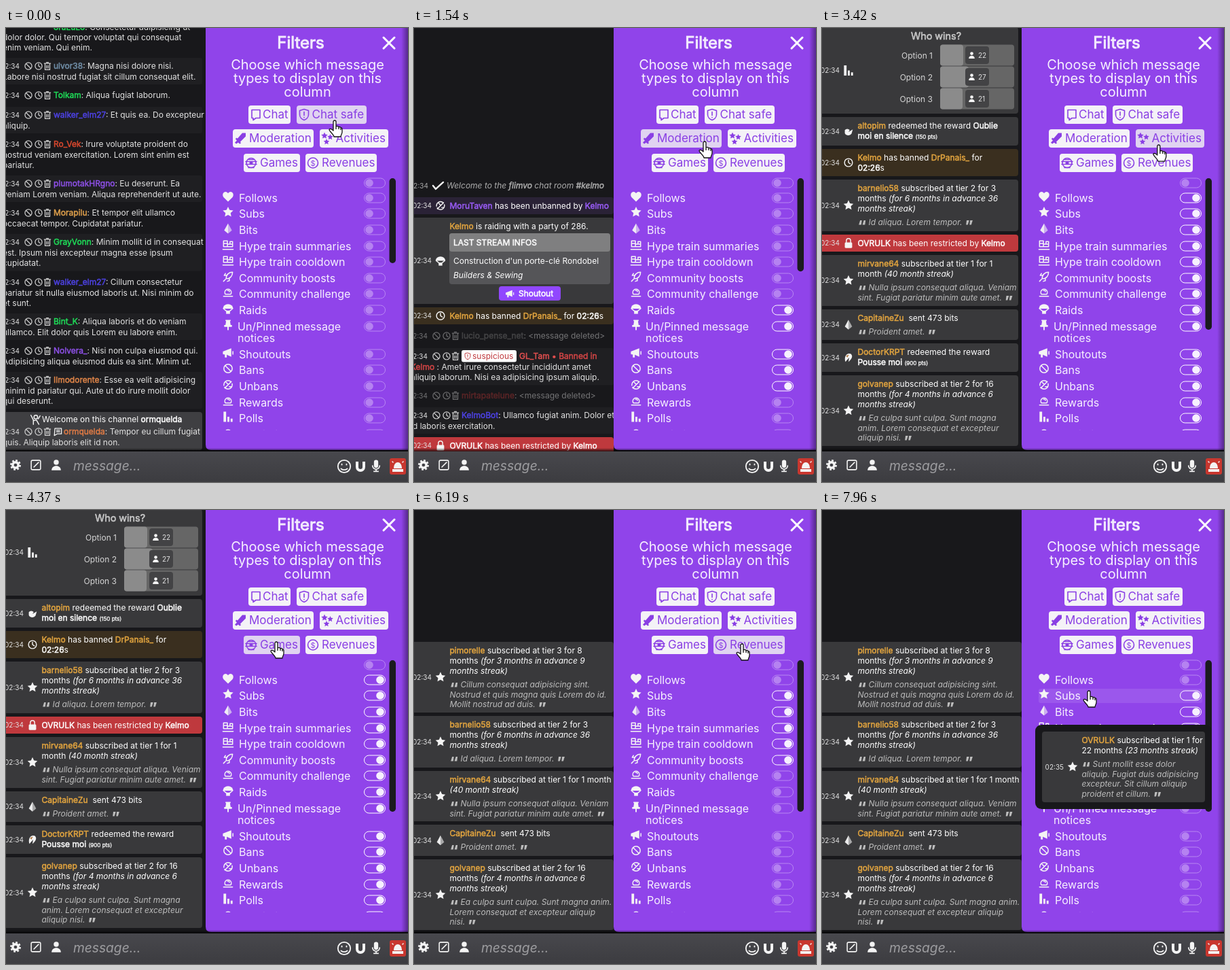
These frames come from a looping animation (592x668 px, 8 s). An HTML page:

```html
<!DOCTYPE html>
<html lang="en">
<head>
<meta charset="utf-8">
<title>Chat filters</title>
<style>
html,body{margin:0;width:592px;height:668px;overflow:hidden;background:#18181b}
svg{display:block;font:12px Inter,"Liberation Sans",sans-serif;font-optical-sizing:none}
text{white-space:pre;color:#e2e2e2}
text,tspan{fill:currentColor}
.b,.y,.p,.r,.s{stroke:currentColor;stroke-width:.04em}
.y{color:#e3a53f}.p{color:#9a5cf8}.r{color:#d34545}.s{font-size:8px}
.i{font-style:italic}
.q{font-size:20px;font-weight:900;font-style:normal}
.w{color:#fff}
.end{text-anchor:end}.mid{text-anchor:middle}
.time{font-size:10px;text-anchor:end}
.quote{color:#bdbdbd;font-style:italic}
.l{fill:none;stroke:currentColor;stroke-width:1.6;stroke-linejoin:round;stroke-linecap:round}
</style>
</head>
<body>
<svg id="stage" width="592" height="668" viewBox="0 0 592 668"></svg>
<script>
const LOOP = 8000, PURPLE = '#9044ea', CARD = '#39393b';

// ---- drawing helpers ----
const rich = s => s.replace(/\[([^\]:]+):([^\]]*)\]/g, (_, k, v) => k[0] === '#'
  ? `<tspan class="b" style="color:${k}">${v}</tspan>` : `<tspan class="${k}">${v}</tspan>`);
const txt = (x, mid, s, cls = '', size = 12, color = '') =>
  `<text x="${x}" y="${mid + size * .364}" class="${cls}" style="${size !== 12 ? `font-size:${size}px;` : ''}${color && 'color:' + color}">${rich(s)}</text>`;
const rect = (x, y, w, h, fill, r = 0, more = '') =>
  `<rect x="${x}" y="${y}" width="${w}" height="${h}" rx="${r}" fill="${fill}" ${more}/>`;
const line = d => `<path class="l" d="${d}"/>`;
const solid = (d, more = '') => `<path d="${d}" ${more}/>`;
const ring = (r, more = '') => `<circle class="l" r="${r}" ${more}/>`;
const starPath = (x, y, r) => 'M' + Array.from({length: 10}, (_, i) => {
  const a = i * Math.PI / 5, d = i % 2 ? r * .48 : r;
  return (x + d * Math.sin(a)).toFixed(2) + ' ' + (y - d * Math.cos(a)).toFixed(2);
}).join('L') + 'Z';

const icons = {
  ban: ring(6.5) + line('M-4.5-4.5L4.5 4.5'),
  unban: ring(6.5, 'stroke-dasharray="16 3"') + line('M-5 5L5-5M-3-4L0-1M2 3H5'),
  clock: ring(6.5) + line('M0-4V0L3 2'),
  trash: line('M-6-5H6M-2-7H2M-4.5-4V7H4.5V-4M-1.5-1V4M1.5-1V4'),
  star: solid(starPath(0, 0, 8.5)),
  stars: solid(starPath(-4, -4, 5) + starPath(4.5, -2, 4.5) + starPath(-1, 5, 4.5)),
  heart: solid('M0 8L-7 1C-11-5-4-11 0-5C4-11 11-5 7 1Z'),
  gem: solid('M0-8L-6 3L0 8Z', 'opacity=".95"') + solid('M0-8L6 3L0 8Z', 'opacity=".6"'),
  train: line('M-8 7H8M-7 3V-6H-1V3M-7-2H-1M-7 3H7V-5H3V-1H-1M3-1H7'),
  rocket: line('M-3 3C-3-4 2-7 7-7C7-2 4 3-3 3ZM-2-2H-6L-4-5M2 2V6L-1 7M-7 7L-4 4'),
  coin: line('M-7 6H7M-4 3A5 5 0 1 1 4 3ZM-1-3A2 2 0 0 1 2-1'),
  chute: solid('M-8 0A8 7 0 0 1 8 0Z') + line('M-7 0L-2 4M7 0L2 4') + solid('M-3 3H3V8H-3Z'),
  pin: solid('M-4-8H4V-6H3L4 0H6V3H1V8H-1V3H-6V0H-4L-3-6H-4Z'),
  horn: solid('M-8-2L5-7V6L-2 3V7H-5V2.5L-8 2Z') + line('M7.5-2V2'),
  bars: solid('M-7-8H-3V8H-7ZM-1 0H2V8H-1ZM4 3H7V8H4Z'),
  shield: line('M0-8L6.5-6V0C6.5 4 3 7 0 8C-3 7-6.5 4-6.5 0V-6ZM0-4V1M0 4V4.2'),
  bubble: line('M-6-7H6V5H0L-4 8V5H-6Z'),
  sword: solid('M8-8V-3L0 5L1 7L-1 8L-3 6L-6 8L-8 6L-5 3L-7 1L-6-1L-4 0L3-8Z'),
  ball: ring(7) + line('M-8-2H8M-8 2H8M-4-5H4M-4 7H4') + `<circle r="2.5"/>`,
  cash: ring(7.5) + txt(0, 0, '$', 'mid', 11, 'inherit'),
  person: `<circle cy="-4" r="3.8"/>` + solid('M-7 8C-7-1 7-1 7 8Z'),
  gear: ring(4.2, 'style="stroke-width:3.6"') + ring(6.8, 'style="stroke-width:2.6;stroke-linecap:butt" stroke-dasharray="2.8 2.54"'),
  slate: line('M-5-7H5Q7-7 7-5V5Q7 7 5 7H-5Q-7 7-7 5V-5Q-7-7-5-7ZM-3 3L4-4'),
  smile: ring(8) + line('M-3-3V-2M3-3V-2M-4 3Q0 6 4 3'),
  magnet: `<path class="l" style="stroke-width:4;stroke-linecap:butt" d="M-5-7V1A5 5 0 0 0 5 1V-7"/>`,
  mic: rect(-3, -8, 6, 11, 'currentColor', 3) + line('M-5 0A5 5 0 0 0 5 0M0 5V8M-3 8H3'),
  siren: solid('M-6 3C-6-9 6-9 6 3ZM-8 4H8V8H-8Z') + line('M-7-6L-8-7M7-6L8-7'),
  lock: rect(-6, -1, 12, 9, 'currentColor', 1.5) + line('M-3.5-1V-4A3.5 3.5 0 0 1 3.5-4V-1'),
  check: `<path class="l" style="stroke-width:2.4" d="M-7 0L-3 5L8-5"/>`,
  wave: `<circle class="l" cx="1" cy="-4" r="3"/>` + line('M-7-7L-3 1V8M-3 2L2 1L6 8M5-1L8-6'),
  note: line('M-5-6H7V4H-1L-6 7ZM-2-3H4M-2 0H4'),
  ghost: solid('M-6 7V-1A6 6 0 0 1 6-1V7Z') + `<g fill="#333"><circle cx="-2" cy="-1" r="1.4"/><circle cx="3" cy="-1" r="1.4"/></g>`,
  bird: solid('M-6-2A5 5 0 0 1 2-2L0 1L7-3L5 4A6 5 0 0 1-6 3Z'),
  loop: ring(6.5, 'stroke-dasharray="13 4"') + solid('M-2-3H2V4H-2Z'),
  wing: solid('M-5 7C-8-2-2-9 4-6C8-2 5 3 0 7L1 0Z') + solid('M-4-3L1-5L-2 0Z', 'fill="#b0763f"'),
};
const ic = (name, x, y, k = 1, color = '#f4f4f4') =>
  `<g transform="translate(${x} ${y}) scale(${k})" fill="currentColor" style="color:${color}">${icons[name]}</g>`;

// ---- chat rows ----
function msg(y, lines, {x = 70, dim = 1, bg, w = 289} = {}) {
  const n = lines.length, step = 15.5;
  return (bg ? rect(-6, y - 12, w + 6, n * step + 8, '#1f1f22', 3) : '') +
    `<g opacity="${dim}">` + txt(20, y, '02:34', 'time', 10) +
    ['ban', 'clock', 'trash'].map((k, i) => ic(k, [33, 48, 61][i], y, .78, '#d0d0d0')).join('') +
    lines.map((s, i) => txt(i ? -5 : x, y + i * step, s)).join('') + '</g>';
}
function event(top, bottom, icon, lines, quote = [], {w = 294, bg = CARD, time = '02:34'} = {}) {
  const mid = (top + bottom) / 2, first = top + 12.7, qy = first + (lines.length - 1) * 15 + 20;
  return rect(-6, top, w + 6, bottom - top, bg, 4) + txt(26, mid, time, 'time', 10) + ic(icon, 39, mid, .9) +
    lines.map((s, i) => txt(52.5, first + i * 15, s, 'w')).join('') +
    (quote.length ? txt(52.5, qy + 5.5, '“', 'q', 20, '#bdbdbd') : '') +
    quote.map((s, i) => txt(i ? 52.5 : 68.5, qy + i * 14.6,
      s + (i === quote.length - 1 ? '<tspan class="q" dx="4" dy="8">”</tspan>' : ''), 'quote')).join('');
}
function poll(top, bottom, fills, counts, w) {
  const barW = w === 294 ? 114 : 109, y0 = top + 41;
  return rect(-6, top, w + 6, bottom - top, CARD, 4) + txt(26, (top + bottom) / 2, '02:34', 'time', 10) +
    ic('bars', 39, (top + bottom) / 2, .95) + txt(w === 294 ? 171 : 168, top + 13, 'Who wins?', 'b mid', 14.4, '#c9c9c9') +
    fills.map((f, i) => {
      const y = y0 + i * 32, c = 174 + barW / 2;
      return txt(163, y + .5, 'Option ' + (i + 1), 'end', 12, '#d6d6d6') + rect(174, y - 15.5, barW, 31, '#666', 4) +
        rect(174, y - 15.5, f, 31, '#8b8b8b', Math.min(4, f / 2)) + rect(c - 17.5, y - 13, 35, 26, '#434345', 4) +
        ic('person', c - 8, y, .62) + txt(c + 1.5, y, '' + counts[i], '', 10);
    }).join('');
}
const banText = '[y:Kelmo] has banned [y:DrPanais_] for', RED = '#bf393d', BROWN = '#3a2f1f';
const restricted = '[b:OVRULK] has been restricted by [b:Kelmo]';
const deleted = '&lt;message deleted>';
const blue = '#4d42e4', green = '#1fdc58', violet = '#8d50e6';

const chatScene = () =>
  txt(70, -1, `[${green}:oraLuLo]: Consectetur adipisicing ut`) +
  txt(-5, 14, 'dolor dolor. Qui tempor voluptat qui consequat') + txt(-5, 29, 'enim veniam. Qui enim.') +
  [[56, '#718fa8', 'ulvor38', 'Magna nisi dolore nisi.', 'Labore nisi nostrud fugiat sit cillum consequat elit.'],
   [99, green, 'Tolkam', 'Aliqua fugiat laborum.'],
   [128, blue, 'walker_elm27', 'Et quis ea. Do excepteur', 'aliquip.'],
   [171, '#d9482e', 'Ro_Vek', 'Irure voluptate proident do', 'nostrud veniam exercitation. Lorem sint enim est', 'pariatur.'],
   [229, violet, 'plumotakHRgno', 'Eu deserunt. Ea', 'veniam Lorem veniam. Aliqua reprehenderit ut aute.'],
   [272, '#dfa04c', 'Morapilu', 'Et tempor elit ullamco', 'occaecat tempor. Cupidatat pariatur.'],
   [315, green, 'GrayVonn', 'Minim mollit id in consequat', 'est. Ipsum nisi excepteur magna esse ipsum', 'cupidatat.'],
   [374, blue, 'walker_elm27', 'Cillum consectetur', 'pariatur sit nulla eiusmod laboris ut. Nisi minim do', 'et sunt.'],
   [432, green, 'Bint_K', 'Aliqua laboris et do veniam', 'ullamco. Elit dolor quis Lorem eu labore enim.'],
   [475, violet, 'Nolvera_', 'Nisi non culpa eiusmod qui.', 'Adipisicing aliqua eiusmod duis ea sint. Minim ut.'],
   [518, '#de8448', 'Ilmodorente', 'Esse ea velit adipisicing', 'minim id pariatur qui. Aute ut do irure mollit dolor', 'qui deserunt.'],
  ].map(([y, c, who, first, ...rest], i) => msg(y, [`[${c}:${who}]: ${first}`, ...rest], {bg: i % 2 === 0})).join('') +
  rect(-6, 565, 295, 56, '#3f3f42', 4) + ic('wave', 43, 576, .9) +
  txt(53, 576, 'Welcome on this channel [b:ormquelda]', 'w') + ic('note', 76, 594, .8) +
  msg(594, ['[#de7a45:ormquelda]: Tempor eu cillum fugiat', 'quis. Aliquip laboris elit id non.'], {x: 85});

const modScene = () =>
  txt(21, 223, '02:34', 'time', 10, '#aaa') + ic('check', 35, 223) +
  txt(48, 223, 'Welcome to the [b:flimvo] chat room [b:#kelmo]', 'i', 12, '#adadad') +
  event(240, 265, 'unban', ['[p:MoruTaven] has been unbanned by [p:Kelmo]'], [], {bg: '#2a2236'}) +
  event(270, 397, 'chute', ['[y:Kelmo] is raiding with a party of 286.']) +
  rect(52, 293, 237, 75, '#555558', 4) + rect(52, 293, 237, 27, '#7f7f80', 4) +
  txt(58, 307, 'LAST STREAM INFOS', 'b w') + txt(58, 334, "Construction d'un porte-clé Rondobel", 'w') +
  txt(58, 355, 'Builders &amp; Sewing', 'i w') +
  rect(125, 371, 91, 21, '#9147ff', 4) + ic('horn', 141, 382, .75) + txt(154, 382, 'Shoutout', 'b w') +
  event(402, 427, 'clock', [banText + ' [b:02:26]s'], [], {bg: BROWN}) +
  msg(444, ['[#777:lucio_pense_net]: ' + deleted], {dim: .45, w: 294}) +
  msg(474, ['', '[r:Kelmo] : Amet irure consectetur incididunt amet', 'aliquip laborum. Nisi ea adipisicing ipsum aliquip.'], {bg: 1, w: 294}) +
  rect(70, 465, 81, 17.5, '#fff', 3) + ic('shield', 79, 474, .6, '#bf393d') + txt(86, 474, 'suspicious', '', 12, '#bf393d') +
  txt(155, 474, '[#e04f4f:GL_Tam • ][r:Banned in]') +
  msg(532, ['[#a33:mirtapatelune]: ' + deleted], {dim: .45, w: 294}) +
  msg(561, [`[${blue}:KelmoBot]: Ullamco fugiat anim. Dolor et`, 'id laboris exercitation.'], {bg: 1, w: 294}) +
  event(593, 618, 'lock', [restricted], [], {bg: RED});

const narrow = {w: 289};
const subBarn = ['[y:barnelio58] subscribed at tier 2 for 3', 'months [i:(for 6 months in advance 36]', '[i:months streak)]'];
const subGol = ['[y:golvanep] subscribed at tier 2 for 16', 'months [i:(for 4 months in advance 6]', '[i:months streak)]'];
const nulla = ['Nulla ipsum consequat aliqua. Veniam', 'sint. Fugiat pariatur minim aute amet.'];
const bits = ['[y:CapitaineZu]  sent 473 bits'];
const silence = ['[y:altopim] redeemed the reward [b:Oublie]', '[b:moi en silence] [s:(150 pts)]'];

const activityScene = () =>
  poll(-1, 126, [34, 42, 33], [22, 27, 21], 289) +
  event(131, 173, 'bird', silence, [], narrow) +
  event(178, 218, 'clock', [banText, '[b:02:26]s'], [], {w: 289, bg: BROWN}) +
  event(223, 299, 'star', subBarn, ['Id aliqua. Lorem tempor.'], narrow) +
  event(304, 329, 'lock', [restricted], [], {w: 289, bg: RED}) +
  event(334, 409, 'star', ['[y:mirvane64] subscribed at tier 1 for 1', 'month [i:(40 month streak)]'], nulla, narrow) +
  event(414, 459, 'gem', bits, ['Proident amet.'], narrow) +
  event(464, 506, 'wing', ['[y:DoctorKRPT] redeemed the reward', '[b:Pousse moi] [s:(900 pts)]'], [], narrow) +
  event(511, 615, 'star', subGol, ['Ea culpa sunt culpa. Sunt magna', 'anim. Lorem consequat et excepteur', 'aliquip nisi.'], narrow);

const gameScene = () =>
  event(43, 85, 'ghost', ['[y:altopim] redeemed the reward [b:Beau flou]', '[s:(200 pts)]']) +
  event(90, 132, 'loop', ['[y:Fog_Teapot] redeemed the reward [b:Tourne]', '[b:moi] [s:(350 pts)]']) +
  poll(137, 392, [7, 27, 12, 13, 18, 14, 24], [12, 48, 19, 22, 31, 25, 42], 294) +
  poll(397, 524, [36, 44, 34], [22, 27, 21], 294) +
  event(529, 571, 'bird', silence) +
  event(576, 618, 'wing', ['[y:DoctorKRPT] redeemed the reward [b:Pousse]', '[b:moi] [s:(900 pts)]']);

const revenueScene = () =>
  event(194, 298, 'star', ['[y:pimorelle] subscribed at tier 3 for 8', 'months [i:(for 3 months in advance 9]', '[i:months streak)]'],
    ['Cillum consequat adipisicing sint.', 'Nostrud et quis magna quis Lorem do id.', 'Mollit nostrud ad duis.']) +
  event(303, 379, 'star', subBarn, ['Id aliqua. Lorem tempor.']) +
  event(384, 458, 'star', ['[y:mirvane64] subscribed at tier 1 for 1 month', '[i:(40 month streak)]'], nulla) +
  event(463, 509, 'gem', bits, ['Proident amet.']) +
  event(514, 618, 'star', subGol, ['Ea culpa sunt culpa. Sunt magna anim.', 'Lorem consequat et excepteur aliquip', 'nisi.']);

// ---- filter panel ----
const buttons = [
  ['Chat', 'bubble', 357, 114, 62, 21], ['Chat safe', 'shield', 428, 114, 103, 22.5],
  ['Moderation', 'sword', 334, 149, 119, 24], ['Activities', 'stars', 462, 149, 101, 23.5],
  ['Games', 'ball', 350, 185, 83, 24], ['Revenues', 'cash', 441, 185, 105, 24]];
const rows = [
  [228], [250, 'heart', 'Follows'], [273, 'star', 'Subs'], [297, 'gem', 'Bits'],
  [321, 'train', 'Hype train summaries'], [344, 'train', 'Hype train cooldown'], [368, 'rocket', 'Community boosts'],
  [391, 'coin', 'Community challenge'], [415, 'chute', 'Raids'], [439, 'pin', 'Un/Pinned message'],
  [480, 'horn', 'Shoutouts'], [503, 'ban', 'Bans'], [527, 'unban', 'Unbans'], [551, 'coin', 'Rewards'],
  [574, 'bars', 'Polls'], [598, 'coin', 'Predictions']];

const panel = () =>
  `<path d="M294 0H592V621H302Q294 621 294 613Z" fill="${PURPLE}"/>` + rect(582, 0, 10, 621, 'url(#edge)') +
  txt(434, 21, 'Filters', 'b mid', 24, '#f3ecfd') +
  `<path class="l" style="color:#fff;stroke-width:3" d="M556 14L572 30M572 14L556 30"/>` +
  ['Choose which message', 'types to display on this', 'column'].map((s, i) => txt(444, 54 + i * 20, s, 'mid', 20, '#f6f0fe')).join('') +
  buttons.map(([s, icon, x, y, w, dx]) => rect(x, y, w, 27, '#f4f2f7', 4, 'class="btn"') +
    ic(icon, x + 11, y + 13.5, 1, '#8a3fe4') + txt(x + dx, y + 13, s, '', 17, '#8a3fe4')).join('') +
  '<g clip-path="url(#list)">' + rect(319, 263, 241, 21, '#fff', 3, 'id="hover" opacity=".1"') +
  rows.map(([y, icon, s]) => (s ? ic(icon, 327, y - 2, .95) + txt(s[2] === '/' ? 341 : 343, y, s, '', 16, '#f6f0fe') : '') +
    `<g class="tog"><rect x="527.5" y="${y - 7}" width="31" height="14" rx="7" fill="none" stroke="#fff"/><circle cy="${y}" r="5.8" fill="#f6f0fe"/></g>`).join('') +
  txt(341, 456.5, 'notices', '', 16, '#f6f0fe') + '</g>' +
  rect(564.5, 221, 9.5, 125, '#1b1b1f', 4.7, 'id="thumb"');

const footer = () =>
  rect(0, 618, 592, 5, 'url(#drop)') + rect(0, 623, 592, 45, 'url(#bar)') +
  ['gear', 'slate', 'person'].map((k, i) => ic(k, 14 + 30 * i, 643, .98)).join('') +
  txt(99, 644, 'message...', 'i', 19.2, '#9d9da0') +
  ic('smile', 498, 645, 1.15) + ic('magnet', 522, 645) + ic('mic', 545, 644, 1.05) +
  rect(565, 633, 24, 24, '#c8372f', 3) + ic('siren', 577, 645);

const popup = () =>
  rect(314, 316, 260, 124, '#18181b', 9, 'id="popBox"') + '<g id="popMsg" transform="translate(330 0)">' +
  event(326, 430, 'star', ['[y:OVRULK] subscribed at tier 1 for', '22 months [i:(23 months streak)]'],
    ['Sunt mollit esse dolor', 'aliquip. Fugiat duis adipisicing', 'excepteur. Sit cillum aliquip', 'proident et cillum.'], {w: 234, time: '02:35'}) + '</g>';

const gradient = (id, dir, a, b) =>
  `<linearGradient id="${id}" x2="${dir}" y2="${1 - dir}"><stop stop-color="${a}"/><stop offset="1" stop-color="${b}"/></linearGradient>`;
const stage = document.getElementById('stage');
stage.innerHTML =
  `<defs>${gradient('edge', 1, 'rgba(0,0,0,0)', 'rgba(0,0,0,.4)')}${gradient('drop', 0, 'rgba(0,0,0,0)', 'rgba(0,0,0,.75)')}${gradient('bar', 0, '#48484d', '#3c3c40')}
  <clipPath id="list"><rect x="300" y="215" width="290" height="377"/></clipPath></defs>` +
  [chatScene, modScene, activityScene, gameScene, revenueScene].map(f => `<g class="scene">${f()}</g>`).join('') +
  panel() + footer() + `<g id="pop">${popup()}</g>` +
  `<g id="cursor" fill="#fff" stroke="#111" stroke-width="1.3" stroke-linejoin="round">
  <path id="hand" d="M-2 2C-2-.7 2-.7 2 2V9C4 8 5.5 8.5 6 9.8C8 9 9 10 9 11C10.5 10.5 11 11.5 11 13V17C11 20 9 21 9 24H-1C-1 21-8 16-8 13.5C-7 11.5-4 12.5-2 15ZM2 9V13M6 10V13M9 11V14"/>
  <path id="arrow" d="M0 0V16L3.7 12.5L6.5 19L9.5 17.8L6.7 11.5H11.5Z"/></g>`;

// ---- timeline ----
const $ = id => document.getElementById(id), all = c => [...stage.querySelectorAll(c)];
const scenes = all('.scene'), btns = all('.btn'), togs = all('.tog');
const swaps = [1280, 2830, 4500, 6180];
const flips = [940, 2790, 4430, 6060];
const active = [[99, 0], [8, 12], [1, 15], [13, 15], [2, 6]];
const path = [[0, 484, 136], [80, 484, 136], [390, 412, 164], [890, 412, 164], [1080, 428, 167], [1600, 428, 167],
  [2040, 496, 172], [3420, 496, 172], [3870, 398, 194], [5120, 398, 194], [5450, 483, 197], [6760, 483, 197],
  [6880, 424, 235], [7070, 424, 235], [7140, 418, 264], [7320, 412, 266], [7640, 412, 266], [7710, 393, 266], [LOOP, 393, 266]];
const ramp = (t, a, b) => Math.min(1, Math.max(0, (t - a) / (b - a)));
const passed = (list, t) => list.filter(v => t >= v).length;
const show = (el, on) => el.setAttribute('display', on ? 'inline' : 'none');
const isOn = (k, i) => +(i >= active[k][0] && i <= active[k][1]);

function cursorAt(t) {
  const n = path.findIndex(p => p[0] > t), a = path[n - 1], b = path[n], k = ramp(t, a[0], b[0]);
  return [a[1] + (b[1] - a[1]) * k, a[2] + (b[2] - a[2]) * k];
}

function render(t) {
  const current = passed(swaps, t), settle = ramp(t, 1470, 2040);
  scenes.forEach((g, i) => show(g, i === current));
  scenes[1].setAttribute('transform', `translate(0 ${10.2 * (1 - settle)})`);
  $('thumb').setAttribute('height', 125 + 98 * settle);

  const k = passed(flips, t), turn = k ? ramp(t, flips[k - 1], flips[k - 1] + 110) : 1;
  togs.forEach((g, i) => {
    const from = k ? isOn(k - 1, i) : 0, v = from + (isOn(k, i) - from) * turn;
    g.setAttribute('opacity', .36 + .64 * v);
    g.lastChild.setAttribute('cx', 535 + 16 * v);
  });

  const [x, y] = cursorAt(t);
  let over = false;
  buttons.forEach(([, , bx, by, w], i) => {
    const hit = x >= bx && x <= bx + w && y >= by && y <= by + 27;
    over = over || hit;
    btns[i].setAttribute('fill', hit ? '#e0d3f1' : '#f4f2f7');
  });
  const row = rows.find(([c]) => c > 240 && Math.abs(y - c) < 11);
  show($('hover'), row);
  if (row) $('hover').setAttribute('y', row[0] - 10);
  show($('hand'), over || row);
  show($('arrow'), !over && !row);
  $('cursor').setAttribute('transform', `translate(${x} ${y})`);

  const loaded = t >= 7890;
  show($('pop'), t >= 7080);
  show($('popMsg'), loaded);
  $('popBox').setAttribute('height', loaded ? 124 : 36);
}

const start = performance.now();
function tick() {
  render((performance.now() - start) % LOOP);
  requestAnimationFrame(tick);
}
tick();
</script>
</body>
</html>
```
